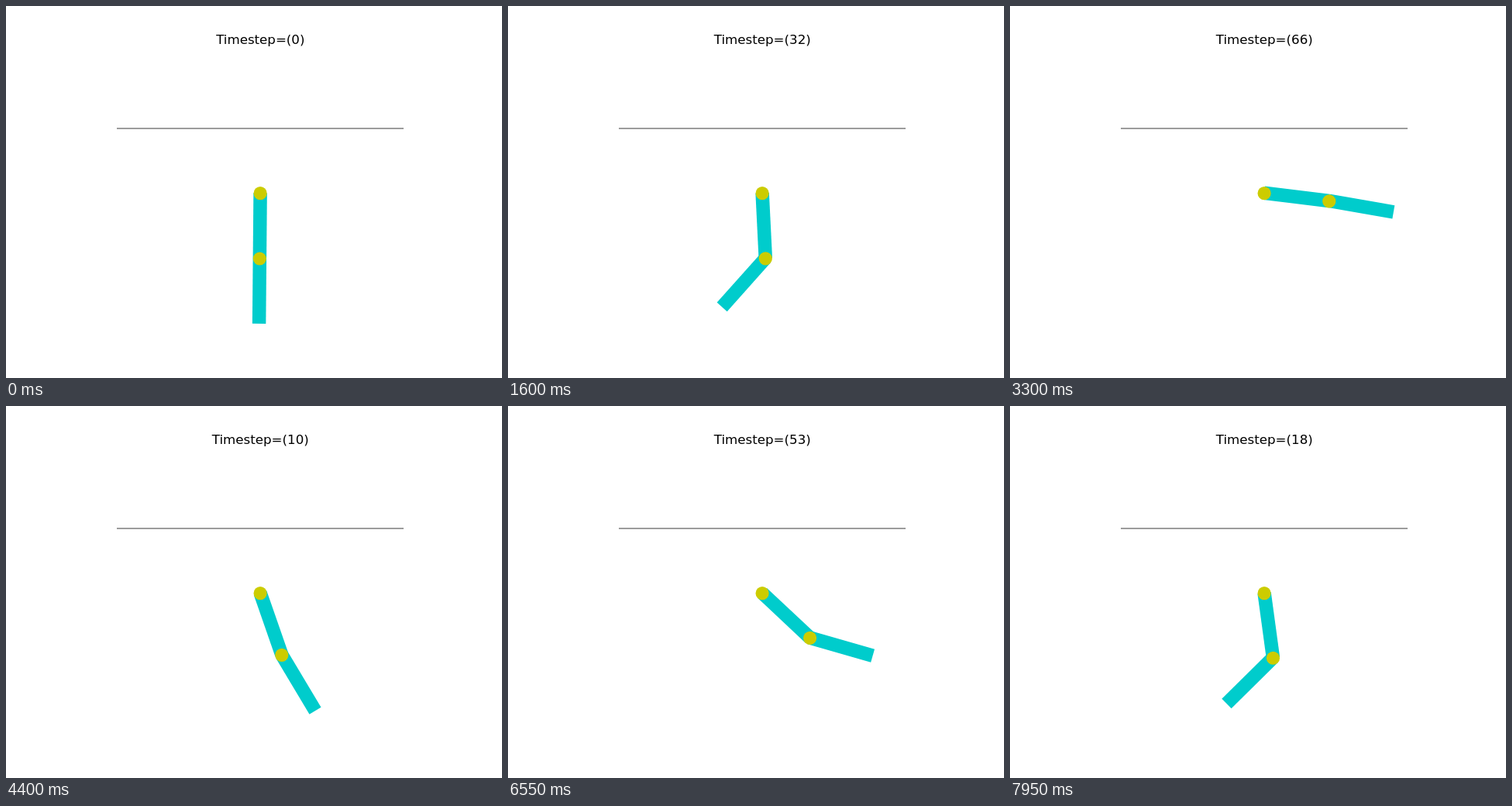
An HTML page that plays this animation: 640 by 480 pixels, repeating every 8000 ms.

```html
<!DOCTYPE html>
<html lang="en">
<head>
<meta charset="utf-8">
<title>Two-link pendulum</title>
<style>
  html, body { margin: 0; width: 100%; height: 100%; overflow: hidden; background: #fff; }
  svg { display: block; width: 640px; height: 480px; }
  text { font: 16.67px "DejaVu Sans", sans-serif; text-anchor: middle; }
  .link { stroke: #00cccc; stroke-width: 17.5; transform: translateY(-.4px); }
  .joint { fill: #cccc00; }
</style>
</head>
<body>
<svg viewBox="0 0 640 480">
  <text id="title" x="328.3" y="49"></text>
  <rect x="143" y="157" width="370" height="2" fill="#9c9c9c"/>
  <line id="upper" class="link"/>
  <circle class="joint" cx="328.1" cy="241.7" r="8.6"/>
  <line id="lower" class="link"/>
  <circle id="elbow" class="joint" r="8.6"/>
</svg>
<script>
const STEP_MS = 50, LOOP_STEPS = 160;
const PIVOT = { x: 328.1, y: 241.7 }, LENGTH = 84.3;
const LEAN = -.009;

// An angle (radians from straight down) that swings ever wider.
const growing = (size, period, peak, power = 1) => step =>
  LEAN + size * step ** power * Math.cos(2 * Math.PI * (step - peak) / period);

// Each episode pumps up its swing, leans out to the right, then throws the lower link over the line.
const episodes = [
  { start: 0, upper: growing(.018, 14.083, 21.21), lower: growing(.0231, 13.5, 24.75),
    release: 59, reach: { step: 66, upper: 1.45, lower: 1.4 }, end: 77 },
  { start: 78, upper: growing(.0348, 13, 9.675), lower: growing(.188, 13, 10.83, .5),
    release: 47, reach: { step: 53, upper: .817, lower: 1.291 }, end: 62 },
  { start: 141, upper: growing(.031, 12, 20.5), lower: growing(.0435, 12, 24), release: 18 }
];
const THROWN = { upper: -1.5, lower: 2.75 };

const mix = (a, b, u) => a + (b - a) * u;
const ease = u => (1 - Math.cos(Math.PI * u)) / 2;
const blend = (from, to, u) => ({
  upper: mix(from.upper, to.upper, ease(u)),
  lower: mix(from.lower, to.lower, u)
});

function poseAt({ upper, lower, release, reach, end }, step) {
  const swung = Math.min(step, release);
  const pose = { upper: upper(swung), lower: lower(swung) };
  if (step <= release) return pose;
  return step <= reach.step
    ? blend(pose, reach, (step - release) / (reach.step - release))
    : blend(reach, THROWN, (step - reach.step) / (end - reach.step));
}

const $ = id => document.getElementById(id);
const set = (node, attrs) => {
  for (const name in attrs) node.setAttribute(name, attrs[name]);
};
const swing = (from, angle) => ({
  x: from.x + LENGTH * Math.sin(angle),
  y: from.y + LENGTH * Math.cos(angle)
});
const join = (node, p, q) => set(node, { x1: p.x, y1: p.y, x2: q.x, y2: q.y });

function draw(time) {
  const index = Math.floor(time / STEP_MS + 1e-6) % LOOP_STEPS;
  const episode = episodes.filter(e => e.start <= index).pop();
  const step = index - episode.start;
  const pose = poseAt(episode, step);
  const elbow = swing(PIVOT, pose.upper);
  join($("upper"), PIVOT, elbow);
  join($("lower"), elbow, swing(elbow, pose.lower));
  set($("elbow"), { cx: elbow.x, cy: elbow.y });
  $("title").textContent = `Timestep=(${step})`;
}

const began = performance.now();
function tick() {
  draw(performance.now() - began);
  requestAnimationFrame(tick);
}
tick();
</script>
</body>
</html>
```
